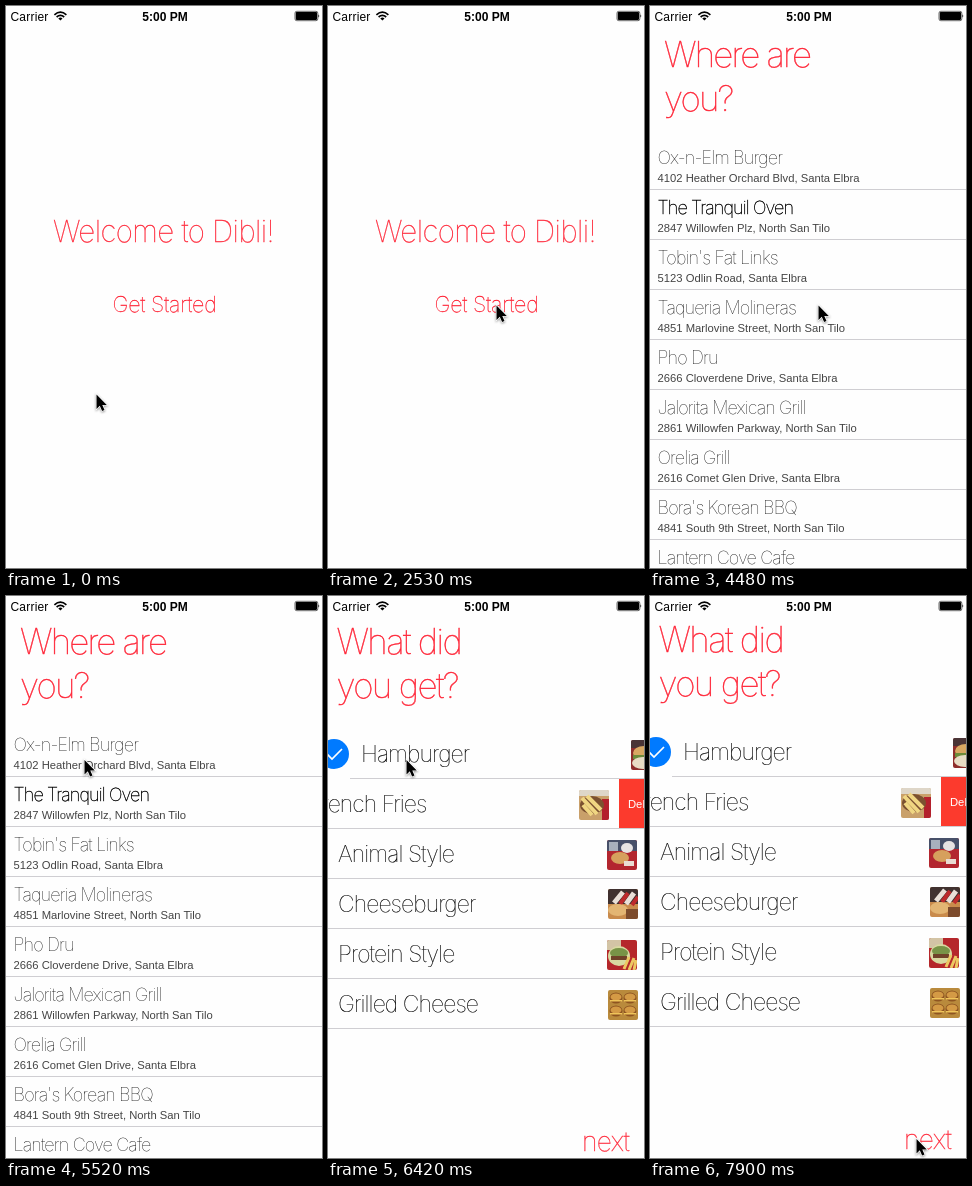
Write an HTML page that moves like this. It is 316x562 px and loops after 8000 ms.

```html
<!DOCTYPE html>
<html lang="en">
<head>
<meta charset="utf-8">
<style>
html, body { margin: 0; width: 100%; height: 100%; overflow: hidden; background: #fefefe; }
svg { display: block; width: 100%; height: 100%; }
text { white-space: pre; }
.thin { font-family: Inter, Roboto, sans-serif; font-weight: 100; font-optical-sizing: none; letter-spacing: -.041em; stroke: currentColor; stroke-width: .15; fill: currentColor; }
.red { color: #ff2638; }
.welcome { font-size: 29.6px; letter-spacing: -.02em; stroke-width: .3; text-anchor: middle; }
.start { font-size: 21.6px; letter-spacing: -.012em; stroke-width: .3; text-anchor: middle; }
.title { font-size: 35px; letter-spacing: -.053em; stroke-width: .45; }
.subject { letter-spacing: -.047em; }
.place { font-size: 18px; letter-spacing: -.048em; stroke: none; }
.strong { stroke: currentColor; stroke-width: .35; }
.dish { font-size: 23px; }
.next { font-size: 26.5px; letter-spacing: -.025em; stroke-width: .3; }
.plain { font-family: "Liberation Sans", Arial, sans-serif; font-size: 11.25px; fill: #444; }
.status { font-size: 12px; fill: #000; }
.rule { stroke: #cfced2; }
</style>
</head>
<body>
<svg viewBox="0 0 316 562">
  <defs><clipPath id="photo"><rect width="30" height="30" rx="2"/></clipPath></defs>
  <text class="thin red welcome" x="157.5" y="236">Welcome to Dibli!</text>
  <text class="thin red start" x="158.5" y="306">Get Started</text>
  <g id="places"></g>
  <g id="dishes"></g>
  <g id="statusBar">
    <text class="plain status" x="4.5" y="14.5" letter-spacing=".2">Carrier</text>
    <g fill="none" stroke="#000" stroke-width="1.7">
      <path d="M48.4 8.8Q54.4 3.6 60.4 8.8M50.6 11Q54.4 7.7 58.2 11"/>
      <path d="M54.4 14.6L52.3 12.4Q54.4 10.8 56.5 12.4Z" fill="#000" stroke="none"/>
    </g>
    <text class="plain status" x="159" y="14.5" font-weight="700" text-anchor="middle">5:00 PM</text>
    <rect x="289" y="5.3" width="22.8" height="9.4" rx="1.8" fill="none" stroke="#000" stroke-width=".6"/>
    <rect x="289.8" y="6.1" width="21.2" height="7.8" rx=".8"/>
    <path d="M312.4 8.2Q314.2 10 312.4 11.8Z"/>
  </g>
  <path id="cursor" d="M0 0V14.4L3.3 11.3L5.6 16.4L8 15.4L5.8 10.4H10.3Z" stroke="#fff" stroke-width="1.4" paint-order="stroke" style="filter:drop-shadow(0 1px 1px #0006)"/>
</svg>
<script>
const LOOP = 8000, HEIGHT = 562;
const byId = id => document.getElementById(id);
const label = (cls, x, y, str) => `<text class="${cls}" x="${x}" y="${y}">${str}</text>`;
const rule = (x1, x2, y) => `<path class="rule" d="M${x1} ${y}H${x2}"/>`;
const box = (x, y, w, h, fill) => `<rect x="${x}" y="${y}" width="${w}" height="${h}" fill="${fill}"/>`;
const oval = (x, y, rx, ry, fill) => `<ellipse cx="${x}" cy="${y}" rx="${rx}" ry="${ry}" fill="${fill}"/>`;
const line = (d, stroke, width) => `<path d="${d}" fill="none" stroke="${stroke}" stroke-width="${width}"/>`;
const sheet = box(0, 0, 316, HEIGHT, "#fefefe");

const places = [
  ["Ox-n-Elm Burger", "4102 Heather Orchard Blvd, Santa Elbra"],
  ["The Tranquil Oven", "2847 Willowfen Plz, North San Tilo"],
  ["Tobin's Fat Links", "5123 Odlin Road, Santa Elbra"],
  ["Taqueria Molineras", "4851 Marlovine Street, North San Tilo"],
  ["Pho Dru", "2666 Cloverdene Drive, Santa Elbra"],
  ["Jalorita Mexican Grill", "2861 Willowfen Parkway, North San Tilo"],
  ["Orelia Grill", "2616 Comet Glen Drive, Santa Elbra"],
  ["Bora's Korean BBQ", "4841 South 9th Street, North San Tilo"],
  ["Lantern Cove Cafe", ""],
];

// name, text x, photo x, photo y, photo shapes
const dishes = [
  ["Hamburger", 33, 303, 142,
    box(0, 0, 30, 30, "#8e2d2b") + box(0, 0, 30, 8, "#4a3436") + oval(13, 13, 11, 7, "#d9a862") +
    box(2, 15, 24, 4, "#6d8b3a") + oval(12, 23, 11, 6, "#e8dcc4")],
  ["French Fries", -18, 251, 192,
    box(0, 0, 30, 30, "#c9a06a") + box(0, 0, 30, 6, "#ded6c8") + box(23, 9, 7, 21, "#b3202c") +
    oval(13, 15, 12, 9, "#7b5130") + line("M3 8L18 24M8 6L22 20M4 15L13 25", "#f0d682", 4)],
  ["Animal Style", 10, 279, 242,
    box(0, 0, 30, 30, "#b3262f") + box(0, 0, 30, 11, "#475069") + box(2, 2, 9, 9, "#a8b0bd") +
    oval(20, 8, 6, 5, "#e7e3e2") + oval(13, 18, 9, 6, "#d6a05d") + box(17, 21, 10, 5, "#e9dcd3")],
  ["Cheeseburger", 10, 280, 291,
    box(0, 0, 30, 30, "#c98b4c") + box(0, 0, 30, 15, "#40312f") + line("M6 14L15 3M18 15L26 4", "#e9dfd7", 5) +
    line("M12 15L20 4M24 16L30 8", "#bd2a2c", 4) + oval(10, 21, 10, 6, "#e3b573") + box(18, 20, 12, 10, "#7d4b2c")],
  ["Protein Style", 10, 279, 342,
    box(0, 0, 30, 30, "#b5272b") + box(0, 0, 14, 10, "#d3c4a5") + oval(12, 16, 11, 10, "#d8d9a0") +
    oval(12, 13, 9, 5, "#789447") + box(4, 16, 16, 4, "#704329") + line("M17 29L22 17M22 30L27 18M27 30L29 20", "#ecc862", 3)],
  ["Grilled Cheese", 10, 280, 392,
    box(0, 0, 30, 30, "#b98a3c") + [[8, 8], [22, 8], [8, 21], [22, 21]].map(([x, y]) =>
      oval(x, y, 6.5, 5.5, "#8e5420") + oval(x, y - 1, 5.5, 3.5, "#d49a45") + box(x - 6, y + 2, 12, 1.5, "#efc45a")).join("")],
];

byId("places").innerHTML = sheet +
  label("thin red title", 14, 58, "Where are") + label("thin red title", 14, 102, "you?") +
  places.map(([name, address], i) => {
    const top = 130 + 50 * i;
    return label(i === 1 ? "thin place strong" : "thin place", 7.5, top + 25, name) +
      label("plain", 7.5, top + 42.5, address) + rule(0, 316, top + 50.5);
  }).join("");

byId("dishes").innerHTML = sheet +
  label("thin red title subject", 8.5, 56, "What did") + label("thin red title subject", 8.5, 100, "you get?") +
  dishes.map(([name, x, photoX, photoY, shapes], i) => {
    const y = 163.5 + 50 * i;
    return label("thin dish", x, y, name) + rule(i ? 0 : 22, 316, y + 17) +
      `<g transform="translate(${photoX} ${photoY})" clip-path="url(#photo)">${shapes}</g>`;
  }).join("") +
  oval(6, 156, 15, 15, "#007aff") + line("M-1 156L4 161L14 151", "#fff", 1.7) +
  box(291, 181, 25, 49, "#fc3a2d") +
  `<text class="plain" x="300" y="209.5" style="fill:#fff">Delete</text>` +
  label("thin red next", 254, 553, "next");

// start, end, number of steps, destination of the pointer
const home = [90.5, 388.5];
const moves = [
  [300, 450, 2, [129.5, 320.5]],
  [1500, 1940, 4, [151.5, 295.5]],
  [2230, 2530, 3, [168.5, 299.5]],
  [4930, 5520, 5, [78.5, 164]],
  [6870, 7900, 8, [266.5, 543]],
];

function pointerAt(t) {
  let from = home;
  for (const [start, end, steps, to] of moves) {
    if (t < start) break;
    if (t < end) {
      const step = Math.floor((t - start) / (end - start) * (steps - 1)) + 1;
      const p = step / steps, eased = p * p * (3 - 2 * p);
      return from.map((v, i) => v + (to[i] - v) * eased);
    }
    from = to;
  }
  return from;
}

// Critically damped rise, sampled every 150 ms; lead is the time already elapsed at the first sample.
function sheetOffset(t, start, lead) {
  if (t < start) return HEIGHT;
  const elapsed = Math.floor((t - start) / 150) * 150 + lead;
  const x = 0.0189 * elapsed;
  return Math.round(HEIGHT * (1 + x) * Math.exp(-x));
}

function place(id, x, y) {
  byId(id).setAttribute("transform", `translate(${x} ${y})`);
}

function draw(now) {
  const t = now % LOOP;
  place("places", 0, sheetOffset(t, 4180, 85.3));
  place("dishes", 0, sheetOffset(t, 6120, 110));
  place("cursor", ...pointerAt(t));
}

const began = performance.now();
function tick() {
  draw(performance.now() - began);
  requestAnimationFrame(tick);
}
tick();
</script>
</body>
</html>
```
